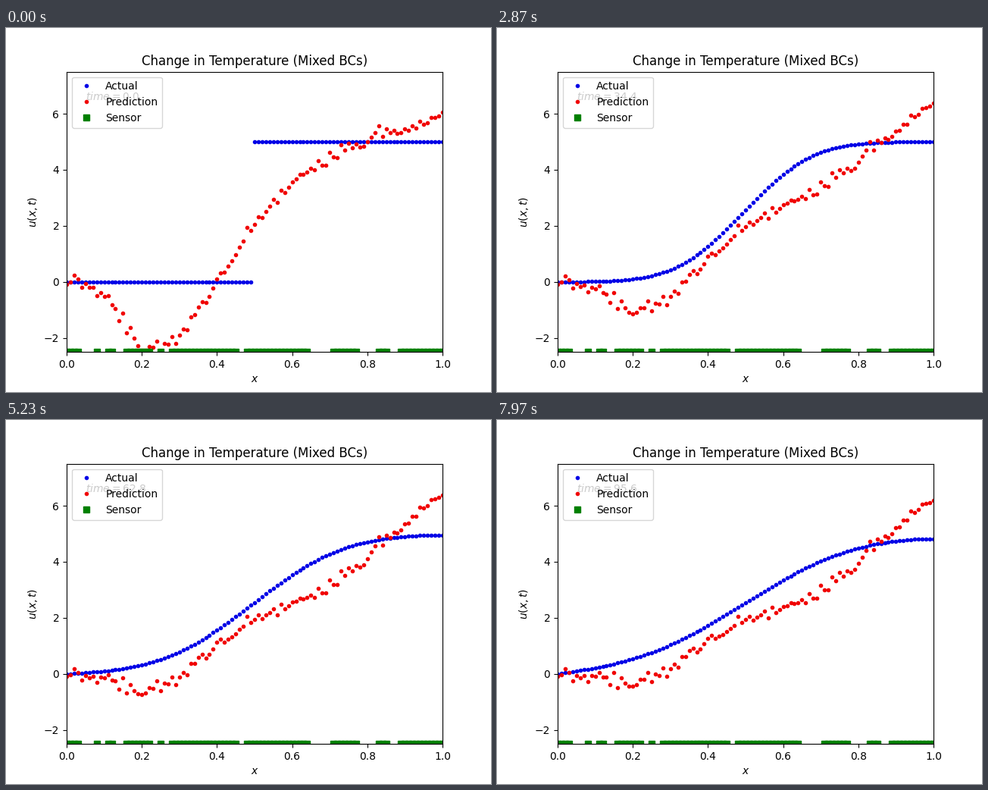
Write a matplotlib script that moves like this. It is 640 px wide and 480 px high and loops after 8000 ms.

```python
import numpy as np
import matplotlib.pyplot as plt
from matplotlib.animation import FuncAnimation

LOOP_MS = 8000
STATES = 240
FRAMES = STATES + 1   # the last state is held for one more frame
DT = 0.4              # model time per state
SUBSTEPS = 4
DIFFUSIVITY = 3e-4
T_END = DT * (STATES - 1)

x = np.linspace(0, 1, 101)
times = DT * np.arange(STATES)


def solve_heat():
    """Fixed value at the left end, zero flux at the right end."""
    r = DIFFUSIVITY * DT / SUBSTEPS / (x[1] - x[0]) ** 2
    u = np.where(np.arange(x.size) >= 50, 5.0, 0.0)
    states = [u.copy()]
    for _ in range(STATES - 1):
        for _ in range(SUBSTEPS):
            u[1:-1] += r * (u[2:] - 2 * u[1:-1] + u[:-2])
            u[0], u[-1] = 0, u[-2]
        states.append(u.copy())
    return states


def decay(t):
    """Slow decay from 1 at the start to 0 at the end."""
    end = np.exp(-T_END / 69)
    return (np.exp(-t / 69) - end) / (1 - end)


def predict():
    """Settled curve with fixed scatter, plus a wave that dies away."""
    t = times[:, None]
    settled = np.interp(x, np.linspace(0, 1, 11),
                        [0, -0.11, -0.35, 0.22, 1.19, 1.97,
                         2.3, 2.9, 4.06, 5.3, 6.2])
    scatter = np.random.default_rng(4).normal(0, 0.12, x.size)

    taper = np.interp(x, [0, 0.2, 0.95, 1], [0, 1, 1, 0.3])
    wave = -(2.6 - 1.6 * x) * taper * np.sin(np.pi * (x - 0.05) / 0.44)
    fast = 0.2 + 0.34 * x
    fade = fast * np.exp(-t / 8) + (1 - fast) * decay(t)
    bulge = 0.24 * x ** 6 * np.sin(np.pi * t / T_END)
    return settled + scatter + wave * fade + bulge


actual = solve_heat()
prediction = predict()

# First and last grid index of each run of sensors
runs = [(0, 3), (8, 8), (11, 12), (16, 22), (25, 25),
        (28, 45), (48, 64), (71, 77), (83, 85), (89, 100)]
sensors = np.concatenate([x[a:b + 1] for a, b in runs])

fig, ax = plt.subplots(figsize=(6.4, 4.8), dpi=100)
ax.set(xlim=(0, 1), ylim=(-2.5, 7.5), xlabel='$x$', ylabel='$u(x,t)$',
       title='Change in Temperature (Mixed BCs)')
actual_dots, = ax.plot(x, actual[0], '.', color='#0000e6', label='Actual')
pred_dots, = ax.plot(x, prediction[0], '.', color='#f00000',
                     label='Prediction')
ax.plot(sensors, np.full(sensors.size, -2.5), 'gs', label='Sensor')
clock = ax.text(0.05, 0.9, '', transform=ax.transAxes)
ax.legend(loc='upper left')


def update(frame):
    i = min(frame, STATES - 1)
    actual_dots.set_ydata(actual[i])
    pred_dots.set_ydata(prediction[i])
    clock.set_text(f'$time = {times[i]:.1f}$')
    return actual_dots, pred_dots, clock


anim = FuncAnimation(fig, update, frames=FRAMES, interval=LOOP_MS / FRAMES,
                     repeat=True, repeat_delay=0)
plt.show()
```
